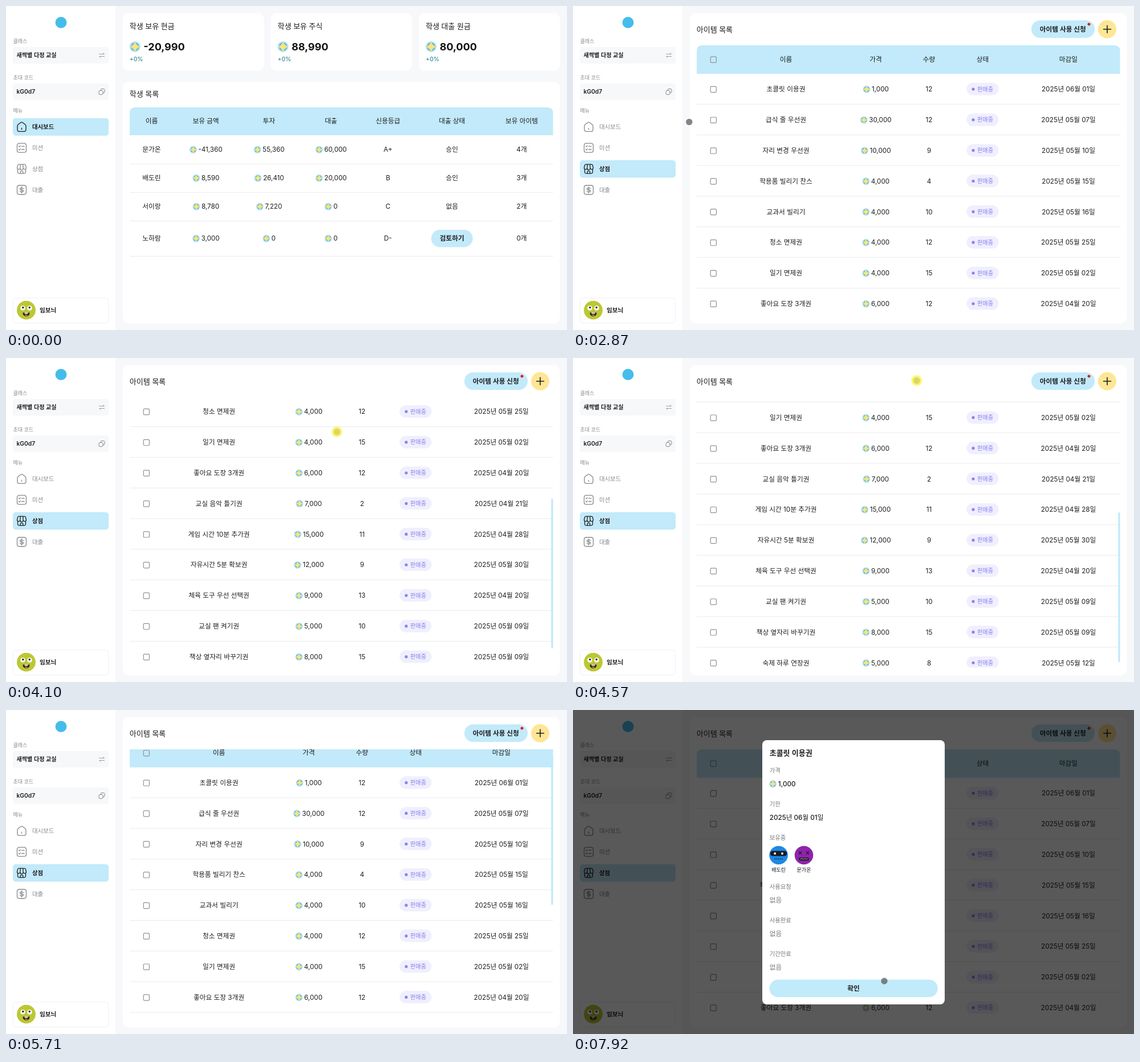
These frames come from a looping animation (984 by 569 pixels, 7990 ms). An HTML page:

```html
<!DOCTYPE html>
<html lang="ko">
<head>
<meta charset="utf-8">
<title>교실 대시보드</title>
<style>
  html, body { margin: 0; width: 100%; height: 100%; overflow: hidden; background: #f7f8fa; }
  svg { display: block; width: 984px; height: 569px; }
  text { font-family: Inter, "Noto Sans CJK KR", "Noto Sans CJK", sans-serif; white-space: pre; }
</style>
</head>
<body>
<svg id="stage" viewBox="0 0 984 569" xmlns="http://www.w3.org/2000/svg"></svg>
<script>
const LOOP = 7990;
const SKY = '#c2eafa', INK = '#1d1d1f', GRAY = '#85888a', LINE = '#e9eaed', SOFT = '#f7f8fa';
const BODY = 11.7;
const pen = document.createElement('canvas').getContext('2d');

// Drawing helpers; text is placed by its vertical centre.
function text(x, cy, s, { size = BODY, weight = 400, fill = INK, anchor = 'middle' } = {}) {
  return `<text x="${x}" y="${cy + size * 0.365}" font-size="${size}" font-weight="${weight}" fill="${fill}" text-anchor="${anchor}">${s}</text>`;
}
const left = (x, cy, s, size, weight, fill = INK) => text(x, cy, s, { size, weight, fill, anchor: 'start' });
const rect = (x, y, w, h, r, fill, extra = '') =>
  `<rect x="${x}" y="${y}" width="${w}" height="${h}" rx="${r}" fill="${fill}" ${extra}/>`;
const disc = (x, y, r, fill, extra = '') => `<circle cx="${x}" cy="${y}" r="${r}" fill="${fill}" ${extra}/>`;
const rule = y => `<path d="M217 ${y}H959.5" stroke="${LINE}" stroke-width="1"/>`;
const icon = (x, y, d, color, width = 1.2) =>
  `<path transform="translate(${x} ${y})" d="${d}" fill="none" stroke="${color}" stroke-width="${width}" stroke-linecap="round" stroke-linejoin="round"/>`;
const headBar = (y, h) =>
  `<path d="M217 ${y + h}V${y + 10}q0-10 10-10H949.5q10 0 10 10V${y + h}z" fill="${SKY}"/>`;

function coin(x, y, r = 6.5) {
  return `<g transform="translate(${x} ${y}) scale(${r})">` + disc(0, 0, 1, '#b0e2f7') + disc(0, 0, 0.74, '#49b3e2') +
    '<path d="M0-.7Q.2-.3 .7 0Q.2 .3 0 .7Q-.2 .3-.7 0Q-.2-.3 0-.7z" fill="#ffe27c" stroke="#ffe27c" stroke-width=".18" stroke-linejoin="round"/></g>';
}
function money(cx, cy, s) {
  pen.font = `400 ${BODY}px Inter, sans-serif`;
  const mid = cx + 8;
  return coin(mid - pen.measureText(s).width / 2 - 9, cy + 0.3) + text(mid, cy, s);
}

const MENU = [
  ['대시보드', 'M-7.5-1.2Q-7.5-3-6-4.2L-1.7-7.5Q0-8.7 1.7-7.5L6-4.2Q7.5-3 7.5-1.2V4.6Q7.5 8 4.1 8H-4.1Q-7.5 8-7.5 4.6zM0 2.2V4.4'],
  ['미션', 'M-4-8H4Q8-8 8-4V4Q8 8 4 8H-4Q-8 8-8 4V-4Q-8-8-4-8zM-5-2.8L-4-1.8L-2.2-4M0-2.8H4.6M-5 2.8L-4 3.8L-2.2 1.6M0 2.8H4.6'],
  ['상점', 'M-5-8H5Q6.5-8 7-6.2L8-1.6A2.7 2.7 0 0 1 2.7-1.2A2.7 2.7 0 0 1-2.7-1.2A2.7 2.7 0 0 1-8-1.6L-7-6.2Q-6.5-8-5-8zM-2.2-8L-2.7-1M2.2-8L2.7-1M-7 1.4V5Q-7 8-4 8H4Q7 8 7 5V1.4M-2.3 8V5.6Q-2.3 3.6 0 3.6Q2.3 3.6 2.3 5.6V8'],
  ['대출', 'M-4-8H4Q8-8 8-4V4Q8 8 4 8H-4Q-8 8-8 4V-4Q-8-8-4-8zM3-2.2Q2.6-3.6 0-3.6Q-3-3.6-3-1.8Q-3-.2 0 0Q3 .2 3 1.9Q3 3.7 0 3.7Q-2.6 3.7-3 2.2M0-5.4V5.4']
];

function sidebar(active) {
  let s = rect(0, 0, 192, 569, 0, '#fff') + disc(96.5, 29, 10, '#45bdea');
  s += left(12.5, 62, '클래스', 9, 500, GRAY) + rect(12, 72, 168, 29, 4, SOFT) +
    left(18.5, 86, '새싹별 다정 교실', 10.1, 600) +
    icon(168, 86.5, 'M-4.5-2H4.5L2.4-4M4.5 2H-4.5L-2.4 4', '#9a9da0', 1);
  s += left(12.5, 126, '초대 코드', 9, 500, GRAY) + rect(12, 136, 168, 29, 4, SOFT) +
    left(18.5, 150, 'kG0d7', 10.3, 600) +
    icon(168, 150.5, 'M-3-2H0Q2-2 2 0V3Q2 5 0 5H-3Q-5 5-5 3V0Q-5-2-3-2zM-2-2V-3Q-2-5 0-5H3Q5-5 5-3V0Q5 2 3 2H2', '#85888a', 1);
  s += left(12.5, 183.5, '메뉴', 9, 500, GRAY);
  MENU.forEach(([name, d], i) => {
    const y = 212.3 + i * 36.9, on = i === active;
    if (on) s += rect(12, y - 15.4, 168, 30.8, 5, SKY);
    s += icon(27.5, y, d, on ? INK : GRAY, 1.3) + left(46, y, name, 10.4, on ? 600 : 500, on ? INK : GRAY);
  });
  s += rect(12.5, 512.8, 167, 44, 5, '#fff', 'stroke="#eff0f7"') + disc(35.5, 534.2, 16.4, '#bcc733');
  for (const [x, y, px] of [[29.5, 530.5, 29.8], [41.5, 530.5, 41.2]])
    s += disc(x, y, 4.3, '#fff') + disc(px, y - 1, 1.7, '#222');
  s += '<path d="M29.5 538.5H41.5Q41.5 545 35.5 545Q29.5 545 29.5 538.5z" fill="#222"/>' +
    '<path d="M32.5 538.5H38.5V540.5H32.5z" fill="#fff"/><path d="M32.5 543Q35.5 540.6 38.5 543Q35.5 545.6 32.5 543z" fill="#e0685c"/>';
  return s + left(59, 534.3, '임보늬', 10.6, 600);
}

function dashboard() {
  let s = sidebar(0);
  [['현금', '-20,990'], ['주식', '88,990'], ['대출', '80,000']].forEach(([kind, sum], i) => {
    const x = 204.8 + i * 259.7, title = kind === '대출' ? '학생 대출 원금' : '학생 보유 ' + kind;
    s += rect(x, 12.5, 247.5, 101, 10, '#fff') + left(x + 12, 35, title, 13, 500) +
      coin(x + 21.4, 71.5, 9.5) + left(x + 36.5, 71.3, sum, 18, 700, '#111') +
      left(x + 12, 93.2, '+0%', 10.5, 400, '#16758c');
  });
  s += rect(204.8, 133, 766.8, 424, 10, '#fff') + left(216.8, 154.7, '학생 목록', 13, 500) + headBar(178, 49);
  const cols = [255.5, 350.5, 461.3, 570, 670, 782.3, 904.5];
  '이름|보유 금액|투자|대출|신용등급|대출 상태|보유 아이템'.split('|')
    .forEach((h, i) => s += text(cols[i], 201.7, h, { weight: 500 }));
  const rows = [
    [252, 277.3, '문가온|-41,360|55,360|60,000|A+|승인|4개'],
    [302, 327.4, '배도린|8,590|26,410|20,000|B|승인|3개'],
    [352, 377.5, '서이랑|8,780|7,220|0|C|없음|2개'],
    [408, 439.5, '노하람|3,000|0|0|D-||0개']
  ];
  for (const [y, edge, cells] of rows) {
    cells.split('|').forEach((c, i) => s += i > 0 && i < 4 ? money(cols[i], y, c) : text(cols[i], y, c));
    s += rule(edge);
  }
  return s + rect(745.8, 393, 73, 30.6, 15.3, SKY) + text(782.3, 408, '검토하기', { weight: 600 });
}

const ITEMS = [
  '초콜릿 이용권|1,000|12|06월 01일', '급식 줄 우선권|30,000|12|05월 07일',
  '자리 변경 우선권|10,000|9|05월 10일', '학용품 빌리기 찬스|4,000|4|05월 15일',
  '교과서 빌리기|4,000|10|05월 16일', '청소 면제권|4,000|12|05월 25일',
  '일기 면제권|4,000|15|05월 02일', '좋아요 도장 3개권|6,000|12|04월 20일',
  '교실 음악 틀기권|7,000|2|04월 21일', '게임 시간 10분 추가권|15,000|11|04월 28일',
  '자유시간 5분 확보권|12,000|9|05월 30일', '체육 도구 우선 선택권|9,000|13|04월 20일',
  '교실 팬 켜기권|5,000|10|05월 09일', '책상 옆자리 바꾸기권|8,000|15|05월 09일',
  '숙제 하루 연장권|5,000|8|05월 12일'
];
const ROW = 53.83, VIEW_TOP = 69, VIEW_H = 474.5, THUMB = 0.5545;
const box = y => rect(241.2, y - 4.9, 10.2, 10.2, 1.5, 'none', 'stroke="#8f9194" stroke-width="1.2"');

function shop() {
  let s = sidebar(2) + rect(204.8, 12.5, 766.8, 544.5, 10, '#fff') + left(216.8, 41, '아이템 목록', 13, 500);
  s += rect(804, 25.3, 111, 30.8, 15.4, SKY) + text(859.3, 40.3, '아이템 사용 신청', { weight: 600 }) +
    disc(905, 32, 3.6, '#f4dedb') + disc(905, 32, 2.5, '#b4352b') +
    disc(937, 40.7, 16, '#ffe695') + icon(937, 40.7, 'M-6.5 0H6.5M0-6.5V6.5', INK, 1.6);
  let list = headBar(69, 50) + box(94);
  [[373.5, '이름'], [531, '가격'], [624.5, '수량'], [718.5, '상태'], [869, '마감일']]
    .forEach(([x, h]) => list += text(x, 93.5, h, { weight: 500 }));
  ITEMS.forEach((item, i) => {
    const y = 146 + i * ROW, [name, price, count, due] = item.split('|');
    list += box(y + 0.3) + text(373.5, y, name) + money(531, y, price) + text(624.5, y, count) +
      rect(690.3, y - 11.2, 56.2, 22, 11, '#f0effd') + disc(702, y, 2.6, '#8a82f2') +
      text(723, y - 0.2, '판매중', { size: 10.2, weight: 500, fill: '#8880f2' }) +
      text(869, y, '2025년 ' + due) + rule(y + 26.5);
  });
  return s + `<g clip-path="url(#view)"><g id="list">${list}</g></g>` +
    rect(956.3, VIEW_TOP, 3.2, VIEW_H * THUMB, 1.6, '#bfeafa', 'id="thumb"');
}

function modal() {
  let s = rect(0, 0, 984, 569, 0, '#000', 'opacity=".65"') + rect(332, 53, 320, 464, 8, '#fff');
  const label = (y, t) => s += left(344.7, y, t, 10.4, 500, '#75787a');
  s += left(344.7, 75.7, '초콜릿 이용권', 13, 600);
  label(106, '가격');
  s += coin(350.6, 129.8) + left(359.8, 129.5, '1,000', BODY, 500);
  label(165.2, '기한');
  s += left(344.7, 188.7, '2025년 06월 01일', BODY, 500);
  label(224.4, '보유중');
  s += disc(360.6, 255, 16.3, '#1e88e5') + rect(346, 247.5, 29.2, 9, 4.5, '#181c22') +
    rect(352.5, 250.3, 3.4, 3.4, 0.5, '#fff') + rect(365.3, 250.3, 3.4, 3.4, 0.5, '#fff') +
    '<path d="M353.5 261.5H368" stroke="#16365c" stroke-width="2" stroke-dasharray="1.6 1.6"/>' +
    text(360.6, 281.2, '배도린', { size: 9, weight: 500 });
  s += disc(405, 255, 16.3, '#8e24aa') +
    icon(398.5, 251, 'M-2-2L2 2M2-2L-2 2', '#1c1420', 1.3) + icon(411.5, 251, 'M-2-2L2 2M2-2L-2 2', '#1c1420', 1.3) +
    rect(396.5, 259.2, 17, 5, 1, '#1c1420') +
    '<path d="M398 262L401 261L404 262L407 261L410 262L412 261" fill="none" stroke="#ddd" stroke-width=".8"/>' +
    text(405, 281.2, '문가온', { size: 9, weight: 500 });
  ['사용요청', '사용완료', '기간만료'].forEach((t, i) => {
    const y = 310 + i * 59.2;
    label(y, t);
    s += left(344.7, y + 23.5, '없음', BODY, 400, '#75787a');
  });
  return s + rect(344.5, 473.5, 295.3, 30.8, 15.4, '#c1ebfa') + text(492, 488.5, '확인', { weight: 600 });
}

const $ = id => document.getElementById(id);
$('stage').innerHTML =
  `<defs><clipPath id="view"><rect x="216" y="${VIEW_TOP}" width="744" height="${VIEW_H}"/></clipPath></defs>` +
  rect(0, 0, 984, 569, 0, SOFT) +
  `<g id="dash">${dashboard()}</g><g id="shop">${shop()}</g><g id="modal">${modal()}</g>` +
  `<g id="cursor">${disc(0, 0, 9.3, '#fcf552', 'id="halo" opacity=".85"')}${disc(0, 0, 5.7, '#55585a', 'id="dot"')}</g>`;

// [time, x, y] and [time, offset]
const PATH = [
  [930, 202, 489], [1200, 150, 400], [1470, 102.5, 288.5], [2690, 102.5, 288.5], [2900, 220, 190],
  [3080, 340, 152], [3280, 460, 260], [3490, 547.5, 444], [3620, 568, 289], [3760, 574, 200],
  [3930, 578, 150], [4100, 580.5, 130], [4300, 585, 74], [4360, 587, 66], [4600, 605, 36],
  [4850, 618, 110], [5100, 627, 221], [5160, 629, 281], [5290, 629, 281], [5440, 623, 392.5],
  [5700, 612, 585], [5900, 600, 585], [5970, 590, 509], [6200, 562, 290], [6460, 547, 147.5],
  [6970, 547, 147.5], [7300, 549, 290], [7700, 547, 452], [7770, 547, 458], [7920, 546, 476]
];
const SCROLL = [
  [3500, 0], [3560, 48], [3620, 110], [3760, 212], [3930, 285], [4100, 321], [4300, 336],
  [4360, 338], [4600, 368], [4850, 381], [5290, 381], [5440, 237.7], [5580, 95], [5680, 28], [5770, 0]
];
const PRESSES = [[2090, 2200], [3490, 4230], [4360, 4700], [5290, 5640], [6650, 6780]];

function at(keys, t) {
  const i = keys.findIndex(k => k[0] > t);
  if (i === 0) return keys[0].slice(1);
  if (i < 0) return keys[keys.length - 1].slice(1);
  const a = keys[i - 1], b = keys[i], p = (t - a[0]) / (b[0] - a[0]);
  return a.slice(1).map((v, n) => v + (b[n + 1] - v) * p);
}
const show = (id, on) => $(id).style.display = on ? '' : 'none';

function render(t) {
  show('dash', t < 2270);
  show('shop', t >= 2270);
  show('modal', t >= 6970);
  show('cursor', t >= 930);

  const [y] = at(SCROLL, t);
  $('list').setAttribute('transform', `translate(0 ${-y})`);
  $('thumb').setAttribute('y', VIEW_TOP + y * THUMB);
  show('thumb', t >= 3550 && t < 6300);

  const [cx, cy] = at(PATH, t);
  const pressed = PRESSES.some(([a, b]) => t >= a && t < b);
  $('cursor').setAttribute('transform', `translate(${cx} ${cy})`);
  show('halo', pressed);
  const faint = t >= 5290 && t < 5640;
  $('dot').setAttribute('opacity', faint ? 0 : pressed ? (t > 3900 && t < 4700 ? 0.2 : 0.34) : 0.72);
}

const start = performance.now();
function tick() {
  render((performance.now() - start) % LOOP);
  requestAnimationFrame(tick);
}
tick();
</script>
</body>
</html>
```
